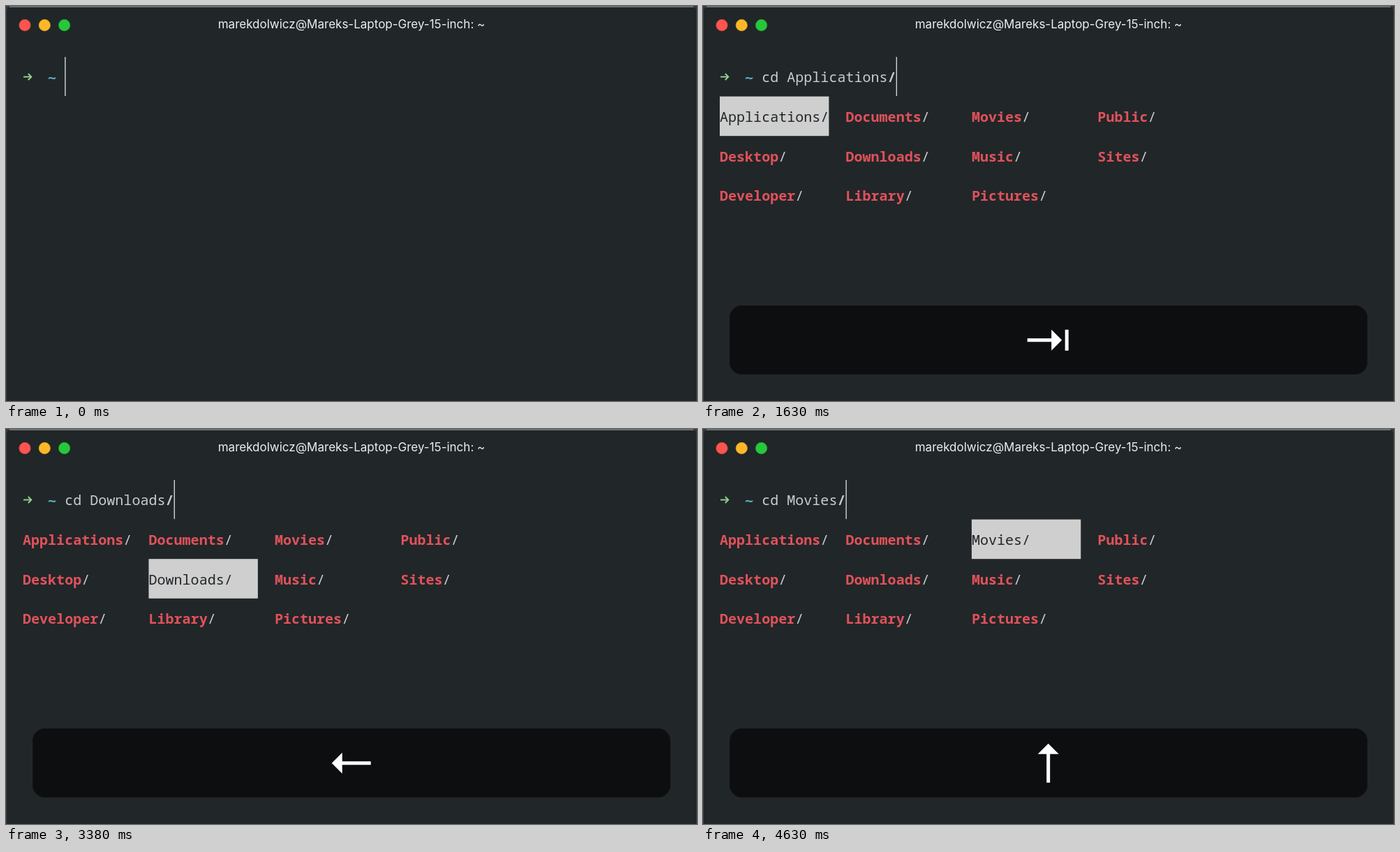
An HTML page with a canvas that plays this animation: 990 by 566 pixels, repeating every 5 s.

```html
<!DOCTYPE html>
<html lang="en">
<head>
<meta charset="utf-8">
<title>Terminal directory completion</title>
<style>
  html, body { margin: 0; width: 100%; height: 100%; overflow: hidden; background: #212629; }
  canvas { display: block; }
</style>
</head>
<body>
<canvas id="stage" width="990" height="566"></canvas>
<script>
const ctx = document.getElementById('stage').getContext('2d');
const LOOP = 5000;
const LEFT = 24, TOP = 73, CELL = 12.03, ROW = 56.6, BASELINE = 36.4;
const COLUMN = 15, NAME_WIDTH = 13, ROWS = 3;
const BACK = '#212629', GREY = '#cbcdcd', RED = '#e0525a', SELECTED = '#cfcfcf';
const MONO = '"Noto Sans Mono", "DejaVu Sans Mono", monospace';
const FOLDERS = ['Applications', 'Desktop', 'Developer', 'Documents', 'Downloads',
  'Library', 'Movies', 'Music', 'Pictures', 'Public', 'Sites'];

// Each step: start time, typed text, key shown, selected folder.
// The folder list is open as soon as a selection is given; '' selects nothing.
const STEPS = [
  [0, '', null],
  [750, 'c', 'C'],
  [880, 'cd', 'D'],
  [1000, 'cd', 'space'],
  [1130, 'cd ', 'space'],
  [1500, 'cd ', 'tab', ''],
  [1630, 'cd ', 'tab', 'Applications'],
  [2630, 'cd ', 'right', 'Documents'],
  [2750, 'cd ', 'right', 'Movies'],
  [3000, 'cd ', 'down', 'Music'],
  [3250, 'cd ', 'left', 'Music'],
  [3380, 'cd ', 'left', 'Downloads'],
  [3500, 'cd ', 'left', 'Desktop'],
  [3630, 'cd ', 'down', 'Desktop'],
  [3750, 'cd ', 'down', 'Developer'],
  [4000, 'cd ', 'right', 'Library'],
  [4130, 'cd ', 'right', 'Pictures'],
  [4380, 'cd ', 'up', 'Pictures'],
  [4500, 'cd ', 'up', 'Music'],
  [4630, 'cd ', 'up', 'Movies']
];

const cellX = col => LEFT + col * CELL;
const rowY = row => TOP + row * ROW;

function print(text, col, row, color, weight = 400, family = MONO) {
  ctx.font = `${weight} 20px ${family}`;
  ctx.textAlign = 'left';
  ctx.fillStyle = color;
  [...text].forEach((ch, i) => ctx.fillText(ch, cellX(col + i), rowY(row) + BASELINE));
}

function roundRect(x, y, w, h, r) {
  ctx.beginPath();
  ctx.roundRect(x, y, w, h, r);
}

function polyline(points) {
  ctx.beginPath();
  points.forEach(([x, y]) => ctx.lineTo(x, y));
}

function drawWindow() {
  ctx.fillStyle = '#35393b';
  ctx.fillRect(0, 0, 990, 566);
  roundRect(0.5, 0.7, 989, 580, 6);
  ctx.fillStyle = BACK;
  ctx.fill();
  ctx.lineWidth = 1;
  ctx.strokeStyle = '#3b4043';
  ctx.stroke();
  ctx.fillStyle = '#84888a';
  ctx.fillRect(5, 0.4, 980, 1.4);

  ['#fd544f', '#fdb827', '#27c73c'].forEach((color, i) => {
    ctx.beginPath();
    ctx.arc(27 + i * 28.3, 27.5, 8.15, 0, Math.PI * 2);
    ctx.fillStyle = color;
    ctx.fill();
    ctx.lineWidth = 0.7;
    ctx.strokeStyle = color;
    ctx.stroke();
    ctx.strokeStyle = 'rgba(0, 0, 0, 0.12)';
    ctx.stroke();
  });

  ctx.font = '400 17px Inter, sans-serif';
  ctx.textAlign = 'center';
  ctx.fillStyle = '#eceeee';
  ctx.fillText('marekdolwicz@Mareks-Laptop-Grey-15-inch: ~', 495, 32);
}

function drawPrompt(typed, selection) {
  ctx.strokeStyle = '#98d08f';
  ctx.lineWidth = 1.9;
  polyline([[25, 101.5], [36, 101.5]]);
  ctx.stroke();
  polyline([[31.8, 97], [36.3, 101.5], [31.8, 106]]);
  ctx.stroke();
  print('~', 3, 0, '#5eaebd', 700, '"DejaVu Sans Mono", monospace');

  const text = typed + (selection || '');
  print(text, 5, 0, GREY);
  let end = 5 + text.length;
  if (selection) print('/', end++, 0, GREY, 700);
  ctx.fillStyle = '#d2d4d4';
  ctx.fillRect(cellX(end), TOP, 1.4, 56);
}

function drawFolders(selection) {
  FOLDERS.forEach((name, i) => {
    const col = Math.floor(i / ROWS) * COLUMN, row = 1 + i % ROWS;
    if (name === selection) {
      ctx.fillStyle = SELECTED;
      ctx.fillRect(cellX(col), rowY(row), NAME_WIDTH * CELL, ROW);
      print(name + '/', col, row, BACK);
    } else {
      print(name, col, row, RED, 600);
      print('/', col + name.length, row, GREY);
    }
  });
}

function drawArrow(start, tip) {
  const neck = tip - 15;
  polyline([[start, -2.5], [neck, -2.5], [neck, -15], [tip, 0],
    [neck, 15], [neck, 2.5], [start, 2.5]]);
  ctx.fill();
}

function drawKey(key) {
  const turns = { right: 0, down: 1, left: 2, up: 3 };
  roundRect(38, 429, 914, 99, 18);
  ctx.fillStyle = '#0c0e0f';
  ctx.fill();
  roundRect(38.5, 429.5, 913, 98, 17.5);
  ctx.strokeStyle = '#101314';
  ctx.lineWidth = 1;
  ctx.stroke();

  ctx.save();
  ctx.translate(494.7, 478.8);
  ctx.fillStyle = ctx.strokeStyle = '#fff';
  if (key in turns) {
    ctx.rotate(turns[key] * Math.PI / 2);
    drawArrow(-28, 28);
  } else if (key === 'tab') {
    drawArrow(-30, 19.5);
    ctx.fillRect(24, -15, 5, 30);
  } else if (key === 'space') {
    ctx.lineWidth = 5;
    polyline([[-16, 4], [-16, 16], [16, 16], [16, 4]]);
    ctx.stroke();
  } else {
    ctx.font = '700 45px "DejaVu Sans", sans-serif';
    ctx.textAlign = 'center';
    ctx.fillText(key, 0, 16.4);
  }
  ctx.restore();
}

function render(time) {
  const [, typed, key, selection] = STEPS.findLast(step => step[0] <= time);
  drawWindow();
  if (selection !== undefined) drawFolders(selection);
  drawPrompt(typed, selection);
  if (key) drawKey(key);
}

const began = performance.now();
function tick() {
  render((performance.now() - began) % LOOP);
  requestAnimationFrame(tick);
}
tick();
</script>
</body>
</html>
```
